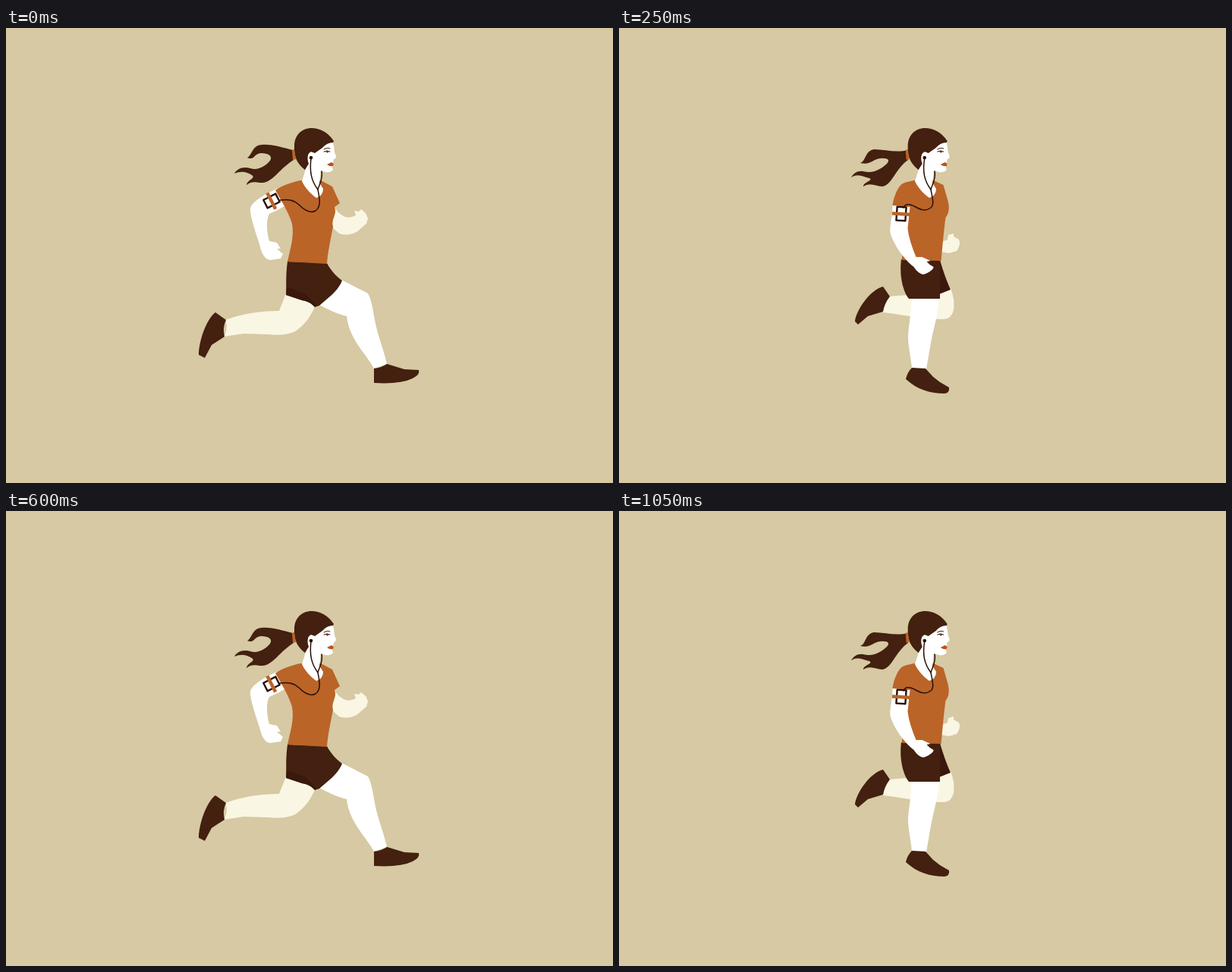
Recreate the animation shown at these times as an HTML page with a canvas. Size 800 px wide and 600 px high, loop 1.2 s.

```html
<!DOCTYPE html>
<html lang="en">
<head>
<meta charset="utf-8">
<title>Runner</title>
<style>
html, body { margin: 0; width: 100%; height: 100%; overflow: hidden; background: #d6c9a3; }
canvas { display: block; width: 800px; height: 600px; }
</style>
</head>
<body>
<canvas id="stage" width="800" height="600"></canvas>
<script>
const ctx = document.getElementById('stage').getContext('2d');
const SAND = '#d6c9a3', BROWN = '#43200f', DARK = '#3a180b', ORANGE = '#ba6428',
      WHITE = '#ffffff', CREAM = '#faf6e4', BLACK = '#2a0f06';

const part = (color, d) => ({ color, path: new Path2D(d) });

function shifted({ color, path }, dx, dy) {
  const moved = new Path2D();
  moved.addPath(path, new DOMMatrix([1, 0, 0, 1, dx, dy]));
  return { color, path: moved };
}

function fill({ color, path }) {
  ctx.fillStyle = color;
  ctx.fill(path);
}

function line(d, width, color = BLACK) {
  ctx.strokeStyle = color;
  ctx.lineWidth = width;
  ctx.stroke(new Path2D(d));
}

function dot(x, y, radius, color) {
  ctx.fillStyle = color;
  ctx.beginPath();
  ctx.arc(x, y, radius, 0, Math.PI * 2);
  ctx.fill();
}

const neck = part(WHITE, 'M396 183L390 202C394 211 402 219 409 224Q418 221 418 212L413 204L415 187Z');
const face = part(WHITE, 'M430 148L432 156L433 164L435 169Q435 172 432 173L431 177L432 180L430 183L431 187Q427 191 421 190L414 188L396 187L396 166L408 162Z');
const hair = part(BROWN, 'M432 149C424 137 413 132 403 132C389 132 380 142 380 156C379 171 385 180 394 187L399 179C396 171 398 165 402 163L407 165L417 158Q423 151 431 151Z');
const tie = part(ORANGE, 'M377 161L380 160L382 173L378 174Z');
const lips = part('#b9531c', 'M423 180L429 177L432 179L431 182Q427 183 423 180Z');
const ear = part(WHITE, 'M398 170Q398 164 403 164Q407 165 406 170Q404 177 401 178Z');

// The upright body is shared by both passing poses.
const uprightShirt = part(ORANGE, 'M389 201C380 203 374 204 371 208C365 216 362 226 361 234L383 237L380 264C379 280 375 294 373 306L425 307C427 286 429 263 431 250C436 244 436 236 434 228L428 207L415 201Z');
const uprightArm = part(WHITE, 'M361 234C361 250 357 260 358 270C362 285 376 305 389 315Q394 323 401 325C407 324 416 318 415 315L410 312L406 308L411 307L400 302L392 302C387 290 382 275 381 264L384 236Z');
const uprightHand = part(CREAM, 'M427 282L434 279L435 273L442 271L442 275L449 279Q452 286 446 294L436 297L425 295Z');
const uprightShoe = part(BROWN, 'M387 449L405 450L415 461L424 468L436 475Q437 482 430 483C412 483 394 478 379 464Q381 455 387 449Z');
const uprightCord = 'M411 213C413 224 416 233 411 237C404 242 398 240 391 236C384 232 377 231 375 237';

const whiteReach = {
  parts: [
    part(BROWN, 'M378 161C364 158 352 153 337 154C324 155 325 167 318 171C328 175 326 166 336 165C346 165 352 169 348 175C341 183 332 188 322 185C312 182 304 186 301 192C310 188 318 190 324 194C330 198 318 200 317 207C324 201 330 204 338 204C352 203 360 186 379 174Z'),
    part(CREAM, 'M431 233C435 241 440 246 447 249Q454 251 461 247L459 241L465 242L468 239L474 244L477 251L475 258L468 264C460 273 447 274 439 271L429 262Z'),
    part(CREAM, 'M369 350L360 373C335 373 310 377 289 385C292 393 291 400 287 407L313 403L345 404C365 406 378 403 384 398C395 390 403 378 407 367L394 356Z'),
    part(BROWN, 'M276 375L290 385Q285 395 288 407L271 418L262 435L254 431C254 415 263 385 276 375Z'),
    part(WHITE, 'M440 331L477 350C482 358 484 375 487 390C490 405 498 425 502 443L485 449C475 430 452 410 449 380C436 377 424 371 411 364Z'),
    part(BROWN, 'M485 449Q495 448 502 443L525 450L544 451Q546 457 536 462Q520 470 485 468Z'),
    part(BROWN, 'M371 308L423 310C428 320 436 328 443 333C440 341 434 348 427 354L413 366L407 368C402 362 396 360 390 359L369 352C370 343 368 330 371 308Z'),
    part(DARK, 'M370 341L395 351L409 366L407 368C402 362 396 360 390 359L369 352Z'),
    part(WHITE, 'M357 212C340 220 324 229 322 238C321 247 330 272 334 285C337 298 341 305 348 306L362 304L365 298L357 291L362 291L357 283L347 281C344 270 342 255 347 245C354 242 361 239 368 234Z'),
    part(ORANGE, 'M388 201C378 203 365 207 355 214L367 235C370 241 374 248 377 258C380 275 375 290 371 308L423 311C424 296 428 278 431 262C428 252 437 246 433 236L440 231L430 209L415 201Z')
  ],
  phone: [350, 228, 153],
  cord: 'M411 213C413 224 416 235 408 241C401 245 393 240 386 233C378 226 372 226 361 227',
  lean: 0
};

const creamStance = {
  parts: [
    part(BROWN, 'M380 161C364 161 350 158 340 164C333 170 333 180 325 185C338 187 336 172 350 171C356 170 357 174 353 178C343 187 332 192 324 190C315 189 313 193 310 199C318 193 322 199 330 198C335 200 322 202 323 207C334 204 336 209 346 209C360 207 364 186 381 174Z'),
    uprightHand,
    part(CREAM, 'M383 385L418 390C415 410 407 428 406 451L387 450C387 432 383 425 382 412Z'),
    uprightShoe,
    part(WHITE, 'M333 360C350 357 370 358 390 361L388 353L437 352Q444 362 445 378Q443 392 431 394C408 394 390 391 375 388C355 386 340 382 327 380Q326 370 333 360Z'),
    part(BROWN, 'M325 347L335 360Q328 370 327 380L306 385L293 397L289 393C290 378 308 350 325 347Z'),
    part(BROWN, 'M371 305L423 306C426 325 433 340 437 353C422 356 405 355 390 356C378 348 369 338 369 325Q369 312 371 305Z'),
    uprightShirt, uprightArm
  ],
  phone: [372.5, 245, 94],
  cord: uprightCord,
  lean: 1
};

const creamReach = {
  parts: [
    part(BROWN, 'M378 161C364 158 356 156 346 156C330 157 324 177 314 181C324 185 324 171 336 167C345 165 350 168 347 173C341 181 332 187 320 184C310 182 303 187 300 192C310 188 318 190 324 193C328 197 319 198 315 202C322 200 330 204 338 204C352 203 360 186 379 174Z'),
    part(CREAM, 'M360 216C345 222 333 229 328 235C334 250 350 268 361 276L368 279L379 277L379 262L366 260L356 246L369 236Z'),
    part('#ad5c24', 'M357 214L384 204L376 240L366 238Z'),
    part(CREAM, 'M439 331L475 359C478 385 480 415 487 446L471 449C464 425 445 410 446 381C435 376 424 368 412 360Z'),
    part(BROWN, 'M471 448Q480 447 487 445L507 455L524 457Q525 462 515 466Q500 470 469 465Z'),
    part(DARK, 'M418 311L423 312C427 320 434 328 441 333C434 343 425 350 414 355Z'),
    part(WHITE, 'M366 354L361 371C335 371 310 374 288 380Q284 392 286 404L311 400L358 406C375 407 386 400 394 392C401 385 406 377 409 366L393 359Z'),
    part(BROWN, 'M276 369L288 380Q284 392 286 405L268 414L257 431L250 427C250 410 262 380 276 369Z'),
    part(BROWN, 'M370 308L421 311C422 330 417 350 409 367L393 361L366 356C369 340 368 325 370 308Z'),
    part(ORANGE, 'M388 201C380 203 375 207 372 214C369 225 371 239 374 248C380 270 374 290 371 309L423 312C424 296 428 278 430 268L435 246L433 222L427 209L415 201Z'),
    part(WHITE, 'M388 242C393 256 402 268 414 273Q426 276 440 271L470 255C478 249 483 243 481 234L475 228L473 221L466 226L463 235L464 227L458 233L456 243C442 248 430 251 417 248L410 231Z')
  ],
  phone: [402.5, 245, 61],
  cord: 'M411 213C416 225 434 231 436 239C435 247 418 249 413 240C411 228 402 227 398 233L397 237',
  lean: 0
};

const whiteStance = {
  parts: [
    part(BROWN, 'M380 161C366 165 350 160 336 160C324 162 326 175 318 178C332 181 334 173 344 172C356 171 357 175 353 179C343 188 334 192 322 189C314 188 310 191 306 197C316 191 322 197 330 198C336 201 322 203 322 209C332 203 338 209 347 209C360 207 364 186 381 174Z'),
    shifted(uprightHand, -1, 0),
    part(CREAM, 'M356 354C366 353 380 352 400 351L437 343Q443 358 441 372Q438 384 428 384C400 384 375 378 348 375Q349 363 356 354Z'),
    part(BROWN, 'M348 341L357 354Q350 363 348 374L328 380L315 391L311 387C312 373 331 345 348 341Z'),
    part(WHITE, 'M386 354L422 354C421 375 415 395 411 415L405 450L386 449C385 435 381 420 381 408C381 395 385 380 386 354Z'),
    shifted(uprightShoe, -1, -1),
    part(DARK, 'M420 306L423 306C427 320 432 334 437 345L422 351Z'),
    part(BROWN, 'M372 305L423 306L423 357Q402 357 382 357C375 349 369 328 372 305Z'),
    shifted(uprightShirt, -0.5, 0),
    shifted(uprightArm, -0.5, 0)
  ],
  phone: [372, 245, 94],
  cord: uprightCord,
  lean: 1
};

function drawPhone([x, y, degrees]) {
  ctx.save();
  ctx.translate(x, y);
  ctx.rotate(degrees * Math.PI / 180);
  ctx.fillStyle = WHITE;
  ctx.fillRect(-9, -6, 18, 12);
  ctx.strokeStyle = BLACK;
  ctx.lineWidth = 2.4;
  ctx.strokeRect(-9, -6, 18, 12);
  ctx.fillStyle = ORANGE;
  ctx.fillRect(-2, -12, 4.5, 24);
  ctx.restore();
}

function drawHead(lean) {
  ctx.save();
  ctx.translate(lean * 0.7, 0);
  [face, hair, ear, tie, lips].forEach(fill);
  line('M419 160Q424 157 427 159', 1);
  line('M419 163Q423 161 427 163', 1);
  dot(423.5, 163, 1.5, '#6b3518');
  dot(402, 171, 2.3, BLACK);
  ctx.restore();
}

function drawPose({ parts, phone, cord, lean }) {
  ctx.fillStyle = SAND;
  ctx.fillRect(0, 0, 800, 600);
  parts.forEach(fill);
  fill(neck);
  drawHead(lean);
  drawPhone(phone);
  line(cord, 1.5);
  line(`M${402 + lean * 0.7} 172C400 189 402 201 411 213M416 189C418 199 413 206 411 213`, 1.5);
}

// A quick stride forwards, then a slow one in the opposite order.
const cycle = [whiteReach, creamStance, creamReach, whiteStance];

function poseAt(ms) {
  const t = ms % 1200;
  const step = t < 300 ? -Math.floor(t / 50) : Math.floor(t / 150);
  return cycle[(step + 8) % 4];
}

ctx.lineCap = 'round';
ctx.lineJoin = 'round';
let start;
function frame(now) {
  start ??= now;
  drawPose(poseAt(Math.max(0, now - start)));
  requestAnimationFrame(frame);
}
drawPose(whiteReach);
requestAnimationFrame(frame);
</script>
</body>
</html>
```
